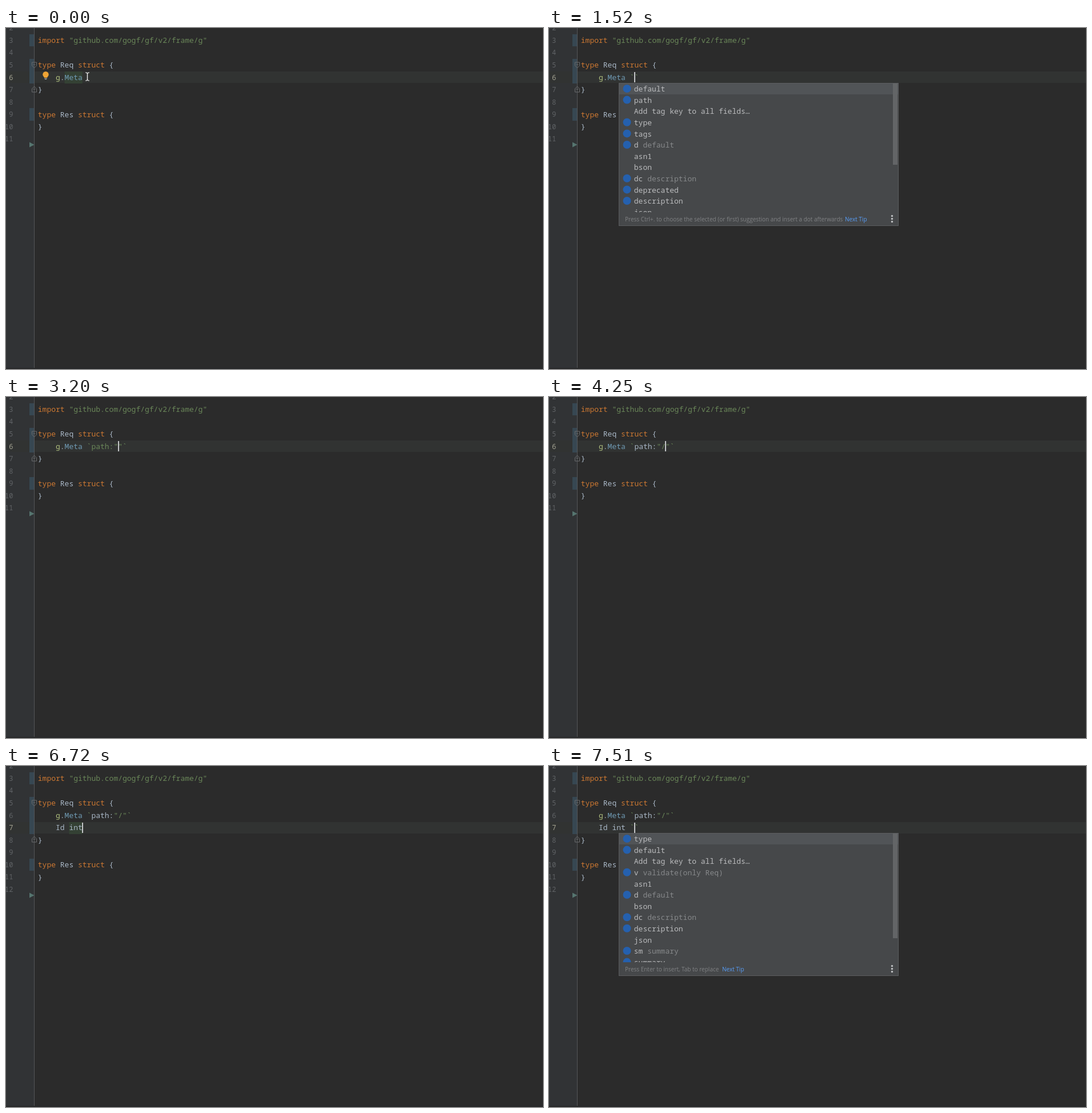
Write an HTML page with a canvas that moves like this. It is 940x596 px and loops after 8000 ms.

```html
<!DOCTYPE html>
<html lang="en">
<head>
<meta charset="utf-8">
<title>Editor completion</title>
<style>
html, body { margin: 0; width: 100%; height: 100%; overflow: hidden; background: #2b2b2b; }
canvas { display: block; width: 940px; height: 596px; }
</style>
</head>
<body>
<canvas id="stage" width="940" height="596"></canvas>
<script>
const ctx = document.getElementById('stage').getContext('2d');
const LOOP = 8000, CHAR = 7.8, LEFT = 55.8, ROW = 19.6;
const MONO = '13px "Noto Sans Mono", "DejaVu Sans Mono", monospace';
const NUMS = '12px "Noto Sans Mono", "DejaVu Sans Mono", monospace';
const HINT = '10px "Open Sans", "Noto Sans", sans-serif';
const IME = '14.2px "Open Sans", "Noto Sans", sans-serif';
const C = {
  bg: '#2b2b2b', gutter: '#313335', line: '#313332', key: '#cc7832', text: '#a9b7c6',
  str: '#6a8759', pkg: '#afbf7e', type: '#6f9ab3', mark: '#344134', bar: '#374752',
  popup: '#46484a', logo: '#2560ae'
};

const between = (t, a, b) => t >= a && t < b;
const lineY = n => 21.5 + 21.57 * (n - 3);
const colX = c => LEFT + CHAR * c;
// last value whose start time has passed
const at = (t, steps) => steps.reduce((v, s) => t >= s[0] ? s[1] : v, null);

// [line, column], or null while the caret is blinked off
const CARET = [
  [70, [6, 10]], [530, null], [790, [6, 11]], [1320, [6, 12]], [2050, null], [2600, [6, 12]],
  [3060, null], [3130, [6, 16]], [3200, [6, 18]], [3990, null], [4180, [6, 19]],
  [4780, [7, 4]], [5240, [7, 5]], [5570, [7, 6]], [6390, [7, 7]], [6450, [7, 8]],
  [6590, [7, 9]], [6650, [7, 10]], [6850, [7, 11]], [7310, [7, 12]]
];
const TAG = [[0, ''], [1320, '``'], [3130, '`path`'], [3200, '`path:""`'], [4180, '`path:"/"`']];
const FIELD = [
  [0, ''], [5240, 'I'], [5570, 'Id'], [6450, 'Id i'], [6590, 'Id in'], [6650, 'Id int'], [7310, 'Id int ``']
];
// leading * marks an entry with an icon; | starts the dim part
const REQ_TAGS = ['*default', '*path', 'Add tag key to all fields…', '*type', '*tags', '*d| default',
  'asn1', 'bson', '*dc| description', '*deprecated', '*description', 'json'];
const FIELD_TAGS = ['*type', '*default', 'Add tag key to all fields…', '*v| validate(only Req)', 'asn1',
  '*d| default', 'bson', '*dc| description', '*description', 'json', '*sm| summary', '*summary'];
const INTS = ['int', 'int8', 'int16', 'int32', 'int64', 'interface'];
const TIP_DOT = 'Press Ctrl+. to choose the selected (or first) suggestion and insert a dot afterwards';
const TIP_ENTER = 'Press Enter to insert, Tab to replace';
const WORDS = [['Id', 112], ['Idea', 176], ['Ideal', 241], ['Ideally', 308], ['Ideas', 387],
  ['Identical', 457], ['Identification', 549]];

function rect(x, y, w, h, color) {
  ctx.fillStyle = color;
  ctx.fillRect(x, y, w, h);
}
function text(s, x, y, color, font = MONO) {
  ctx.font = font;
  ctx.fillStyle = color;
  ctx.fillText(s, x, y);
}
function disc(x, y, r, color) {
  ctx.fillStyle = color;
  ctx.beginPath();
  ctx.arc(x, y, r, 0, 7);
  ctx.fill();
}
function trace(points, closed) {
  ctx.beginPath();
  points.forEach(p => ctx.lineTo(p[0], p[1]));
  if (closed) ctx.closePath();
}
function poly(color, ...points) {
  trace(points, true);
  ctx.fillStyle = color;
  ctx.fill();
}
function stroke(color, width, points, closed) {
  trace(points, closed);
  ctx.strokeStyle = color;
  ctx.lineWidth = width;
  ctx.stroke();
}
function box(x, y, w, h, r, color) {
  ctx.fillStyle = color;
  ctx.beginPath();
  ctx.roundRect(x, y, w, h, r);
  ctx.fill();
}
// parts alternate text and colour
function code(line, col, ...parts) {
  const y = Math.round(lineY(line) + 4.6);
  for (let i = 0; i < parts.length; i += 2) {
    text(parts[i], colX(col), y, parts[i + 1]);
    col += parts[i].length;
  }
}
function mark(line, col, len) {
  rect(colX(col), Math.round(lineY(line)) - 10, len * CHAR, 21, C.mark);
}
function changed(first, last) {
  const top = Math.round(lineY(first) - 10.8);
  rect(41, top, 8, Math.round(lineY(last) + 10.8) - top, C.bar);
}

function fold(y, dir) {
  const e = 4.5 * dir;
  stroke('#6a6c6e', 1, [[45.5, y - e], [53.5, y - e], [53.5, y + e * 0.3], [49.5, y + e * 1.2],
    [45.5, y + e * 0.3]], true);
  stroke('#6a6c6e', 1, [[47.5, y - 0.5], [51.5, y - 0.5]]);
}

function gutter(extra, current) {
  rect(0, 0, 49, 596, C.gutter);
  rect(0, Math.round(lineY(current)) - 10, 940, 20, C.line);
  ctx.textAlign = 'right';
  for (let n = 2; n <= 11 + extra; n++) {
    text(n, 12.4, Math.round(lineY(n) + 4.4), n === current ? '#a4a392' : '#606366', NUMS);
  }
  ctx.textAlign = 'left';
}

function bulb() {
  disc(69.5, 81.3, 5.2, '#eda335');
  poly('#eda335', [66, 84], [73, 84], [72, 87], [67, 87]);
  rect(67, 88, 5, 1, '#9a9c9e');
  rect(68, 89, 3, 1, '#9a9c9e');
}

function ibeam() {
  const c = '#f0f0f0';
  stroke(c, 1.4, [[142.5, 79], [142.5, 91]]);
  stroke(c, 1.2, [[139, 78], [141, 78], [142.5, 79.5], [144, 78], [146, 78]]);
  stroke(c, 1.2, [[139, 92], [141, 92], [142.5, 90.5], [144, 92], [146, 92]]);
}

function editor(t) {
  const extra = t >= 4780 ? 1 : 0, tag = at(t, TAG), field = at(t, FIELD);
  rect(0, 0, 940, 596, C.bg);
  gutter(extra, 6 + extra);
  changed(3, 3);
  changed(5, t >= 5240 ? 7 : 6);
  changed(9 + extra, 9 + extra);
  rect(49, 0, 1, 596, '#555759');
  rect(0, 594, 940, 2, '#262728');

  const runY = Math.round(lineY(11 + extra) + 10);
  poly('#56756f', [41, runY - 4.5], [49.5, runY], [41, runY + 4.5]);
  if (t < 790) mark(6, 6, 4);
  if (between(t, 5240, 5970)) mark(7, 4, field.length);
  if (between(t, 6720, 6850)) mark(7, 7, 3);

  code(3, 0, 'import', C.key, ' "github.com/gogf/gf/v2/frame/g"', C.str);
  code(5, 0, 'type ', C.key, 'Req ', C.text, 'struct ', C.key, '{', C.text);
  code(6, 4, 'g', C.pkg, '.', C.text, 'Meta ', C.type);
  const tail = tag.indexOf(':') + 1 || tag.length - 1;
  if (tag) {
    code(6, 11, '`', C.str, tag.slice(1, tail), t < 3460 ? C.str : C.text, tag.slice(tail), C.str);
  }
  code(7, 4, field.slice(0, 7), C.text, field.slice(7), C.str);
  if (between(t, 5240, 5970)) rect(colX(4), 114, field.length * CHAR, 1, C.text);
  code(7 + extra, 0, '}', C.text);
  code(9 + extra, 0, 'type ', C.key, 'Res ', C.text, 'struct ', C.key, '{', C.text);
  code(10 + extra, 0, '}', C.text);
  fold(64.5, 1);
  fold(Math.round(lineY(7 + extra)) - 0.5, -1);

  if (t < 330 || between(t, 3990, 4180)) bulb();
  const caret = at(t, CARET);
  if (caret) rect(Math.floor(colX(caret[1]) - 0.2), Math.round(lineY(caret[0])) - 9, 2, 18, '#c4c6c8');
  if (t < 790) ibeam();
}

function popup(x, y, w, h, rows, pick, pickColor, tip, tipX, bar) {
  rect(x, y, w, h, '#5b5d5f');
  rect(x + 1, y + 1, w - 2, h - 2, C.popup);
  ctx.save();
  ctx.beginPath();
  ctx.rect(x + 1, y + 1, w - 2, h - 25);
  ctx.clip();
  rect(x + 1, Math.round(y + 1 + pick * ROW), w - 2, 19, pickColor);
  rows.forEach((row, i) => {
    const mid = y + 10.6 + i * ROW, icon = row[0] === '*';
    const [name, dim = ''] = row.slice(icon ? 1 : 0).split('|');
    if (icon) disc(x + 14.5, mid - 0.6, 7, C.logo);
    text(name, x + 26.8, Math.round(mid + 4.5), '#bbbcbe');
    text(dim, x + 26.8 + name.length * CHAR, Math.round(mid + 4.5), '#86888a');
  });
  if (bar) rect(x + w - 10, y + 1, 8, bar, '#636567');
  ctx.restore();
  const foot = y + h - 12;
  text(tip, x + 11, foot + 3.6, '#808284', HINT);
  text('Next Tip', x + tipX, foot + 3.6, '#589df6', HINT);
  [-5, 0, 5].forEach(d => disc(x + w - 11.5, foot - 0.5 + d, 1.7, '#c0c2c4'));
}

function candidates(words, cellEnd, right, alpha) {
  const navX = right - 108;
  ctx.save();
  ctx.globalAlpha = alpha;
  ctx.shadowColor = 'rgba(0,0,0,.35)';
  ctx.shadowBlur = 14;
  ctx.shadowOffsetY = 5;
  box(95.5, 120, right - 95.5, 33.5, 6, '#f9f9f9');
  ctx.shadowColor = 'transparent';
  box(100, 124.5, cellEnd - 100, 26, 4, '#efefef');
  box(100, 129, 3.5, 16, 1.7, '#454c86');
  words.forEach(([word, x], i) => {
    text(i + 1, x, 143, '#555', IME);
    text(word, x + 12.3, 143, '#161616', IME);
  });
  rect(navX, 121, 1, 32, '#ececec');
  rect(navX + 51, 121, 1, 32, '#ececec');
  poly('#a8a8a8', [navX + 17, 134], [navX + 17, 142], [navX + 10.5, 138]);
  poly('#111', [navX + 34.5, 133.5], [navX + 34.5, 142.5], [navX + 41, 138]);
  const hx = navX + 68.5;
  stroke('#222', 1.4, [[hx - 2, 131.5], [hx - 9, 131.5], [hx - 9, 144.5], [hx + 4, 144.5], [hx + 4, 140]]);
  disc(hx - 0.2, 132.6, 2.7, '#111');
  disc(hx + 3.6, 132.6, 2.7, '#111');
  poly('#111', [hx - 2.6, 134], [hx + 6, 134], [hx + 1.7, 138.8]);
  stroke('#222', 1.3, [[navX + 89, 135], [navX + 94.7, 140.8], [navX + 100.4, 135]]);
  ctx.restore();
}

function draw(t) {
  editor(t);
  if (between(t, 1520, 3130)) {
    const moved = t >= 2800;
    popup(122, 96, 490, 250, REQ_TAGS, moved ? 1 : 0, moved ? '#113a5c' : '#515457', TIP_DOT, 396, 142);
  }
  if (between(t, 5240, 5570)) candidates([['I', 112]], 153, 273, t < 5320 ? 0.5 : 1);
  if (between(t, 5570, 6050)) candidates(WORDS, 161, 768, t < 5970 ? 1 : 0.5);
  if (between(t, 6520, 6720)) popup(83, 117, 505, 142, INTS, 0, '#113a5c', TIP_ENTER, 181, 0);
  if (t >= 7510) popup(122, 117, 490, 250, FIELD_TAGS, 0, '#515457', TIP_ENTER, 181, 183);
}

const start = performance.now();
function tick() {
  draw((performance.now() - start) % LOOP);
  requestAnimationFrame(tick);
}
tick();
</script>
</body>
</html>
```
